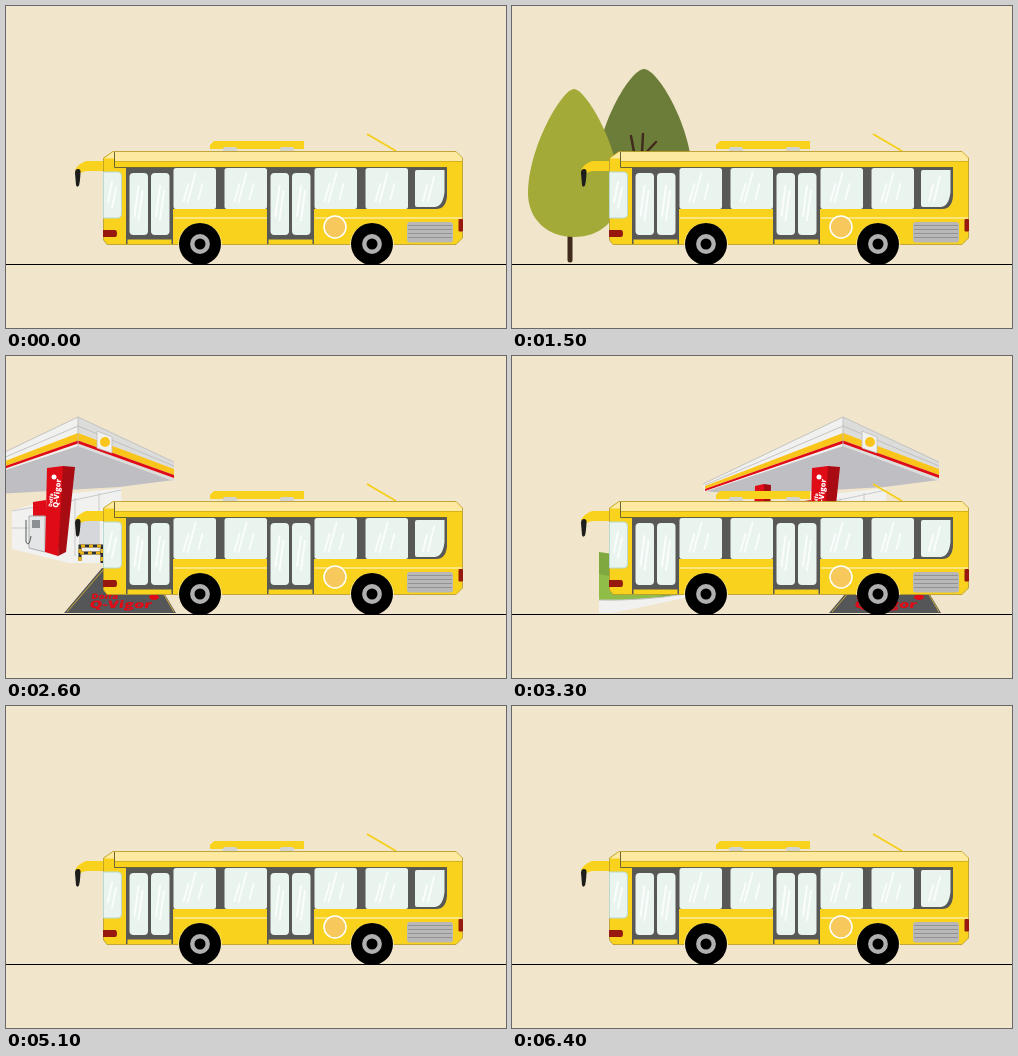
An HTML page that plays this animation: 500 px wide and 322 px high, repeating every 6.5 s.

```html
<!DOCTYPE html>
<html lang="en">
<head>
<meta charset="utf-8">
<title>Trolleybus ride</title>
<style>
  html, body { margin: 0; width: 100%; height: 100%; overflow: hidden; background: #f1e5cb; }
  svg { display: block; width: 100vw; height: 100vh; }
  text { font-family: "Open Sans", "Liberation Sans", sans-serif; font-weight: 800; }

  .pair, .grove, .station { animation: 6.5s infinite; }
  .pair { animation-name: pair; }
  .grove { animation-name: grove; }
  .station { animation-name: station; animation-timing-function: step-end; }

  /* Two passes of 12 steps, 61px each */
  @keyframes pair {
    0% { transform: translateX(-427px); animation-timing-function: steps(12); }
    18.461% { transform: translateX(305px); animation-timing-function: step-end; }
    18.4611% { transform: translateX(-427px); animation-timing-function: steps(12); }
    36.922%, 100% { transform: translateX(305px); }
  }
  @keyframes grove {
    0% { transform: translateX(-480px); animation-timing-function: step-end; }
    81.538% { transform: translateX(-480px); animation-timing-function: steps(12); }
    100% { transform: translateX(342px); }
  }
  @keyframes station {
    0% { transform: translateX(-450px); }
    38.461% { transform: translateX(-345.5px); }
    39.999% { transform: translateX(-259px); }
    43.076% { transform: translateX(-173px); }
    46.153% { transform: translateX(-86px); }
    50.769% { transform: translateX(0); }
    66.153% { transform: translateX(86px); }
    70.769% { transform: translateX(173px); }
    73.846% { transform: translateX(259px); }
    76.923% { transform: translateX(346px); }
    78.461%, 100% { transform: translateX(450px); }
  }

  .glass { fill: #e9f4ee; }
  .shine { fill: none; stroke: #fff; stroke-width: 2; stroke-linecap: round; opacity: .8; }
  .dark { fill: #585856; }
  .body { fill: #f8d21c; }
  .pale { fill: #fdeaa0; }
  .bark { fill: none; stroke: #402b1d; stroke-linecap: round; }
  .red { fill: #df0b16; }
  .white { fill: #f1f1f0; }
  .sun { fill: #fac51b; }
</style>
</head>
<body>
<svg viewBox="0 0 500 322">
  <defs>
    <g id="light">
      <path class="bark" stroke-width="5" d="M-4 215V254"/>
      <path fill="#a3aa37" d="M0 83C12 83 46 142 46 187C46 214 26 231 0 231S-46 214 -46 187C-46 142 -12 83 0 83Z"/>
    </g>
    <g id="deep">
      <path fill="#6c7d39" d="M0 63C14 63 48 122 48 168C48 198 28 214 0 214S-48 198 -48 168C-48 122 -14 63 0 63Z"/>
      <path class="bark" stroke-width="4.5" d="M-4 235L-3 160"/>
      <path class="bark" stroke-width="2.5" d="M-3 165L-1 128M-3 157L-10 146L-13 130M-4 187L-18 173L-20 163M-3 152L12 136M-4 178L10 163"/>
    </g>
    <g id="pane">
      <rect class="glass" width="42.500" height="41" rx="2.5"/>
      <path class="shine" d="M15 16L10 33M22 5L14 34M29 16L25 31"/>
    </g>
    <g id="leaf">
      <rect class="glass" width="18.5" height="62" rx="4"/>
      <path class="shine" d="M9 13L5 43M13 18L9 47"/>
    </g>
    <g id="door">
      <path class="dark" d="M0 0H47V76H45.5V71.5H1.5V76H0Z"/>
      <use href="#leaf" x="3.5" y="5"/>
      <use href="#leaf" x="25" y="5"/>
    </g>
    <g id="wheel">
      <path d="M-22 1A22 22 0 0 1 22 1Z" fill="#fbe88e"/>
      <circle r="21"/>
      <circle r="7.700" fill="none" stroke="#b0b0b0" stroke-width="4.400"/>
    </g>
  </defs>

  <g class="pair">
    <use href="#deep" x="376"/>
    <use href="#light" x="306"/>
  </g>

  <g class="grove">
    <use href="#deep" transform="translate(352 55) scale(.8)"/>
    <use href="#light" transform="translate(276 1)"/>
    <use href="#light" transform="translate(434 26) scale(.9)"/>
  </g>

  <g class="station">
    <!-- lawn and kerb -->
    <path fill="#7fa940" d="M87 196Q112 198 136 212T175 239L140 245H87Z"/>
    <path fill="#8fbd48" d="M87 218Q118 222 150 240L120 245H87Z"/>
    <path class="white" d="M87 244Q130 245 173 238V242Q130 251 100 257H87Z"/>
    <path fill="none" stroke="#c3c4c2" d="M87 244Q130 245 173 238"/>

    <!-- shop -->
    <path class="white" d="M265 155L318 138L374 132L377 207H322L265 193Z"/>
    <path fill="none" stroke="#c9cacc" d="M265 155L318 146L374 134M328 142V200M352 137V196M265 172H298"/>
    <path fill="#d5d7da" d="M332 162H352V190H332Z"/>

    <!-- canopy -->
    <path fill="#bfbec3" d="M192 135L331 88L427 124L372 131L232 139Z"/>
    <path class="white" d="M191 128L331 61L427 106V125L331 90L192 136Z"/>
    <path fill="#dcdcdb" d="M331 61L427 106V125L331 90Z"/>
    <path class="sun" d="M193 130L331 77L427 113V119L331 84.500L193 133Z"/>
    <path class="red" d="M193 133L331 84.500L427 119V122L331 87.500L193 135Z"/>
    <path fill="none" stroke="#b9b9b8" stroke-width=".8" d="M191 128L331 61L427 106M193 129L331 70L427 110M331 61V90"/>
    <path class="white" stroke="#bdbdbc" stroke-width=".8" d="M350 75L365 81V97L350 92Z"/>
    <circle class="sun" cx="358" cy="86" r="5"/>

    <!-- pumps and pillars -->
    <path class="red" d="M243 130L252 128V190L241 187Z"/>
    <path fill="#a50a12" d="M252 128L259 129L257 187L252 190Z"/>
    <path class="red" d="M286 146L299 144V160H286Z"/>
    <path fill="#e4e5e6" stroke="#a8aaac" d="M282 160H298V196L282 192Z"/>
    <path fill="#8d9093" d="M285 164H293V172H285Z"/>
    <path fill="none" stroke="#55575a" d="M279 164V186Q282 192 284 180"/>
    <path class="red" d="M300 112L316 110L321 112L311 200L298 196Z"/>
    <path fill="#a90b13" d="M316 110L328 111L319 196L311 200Z"/>
    <circle cx="307" cy="121" r="2.5" fill="#fff"/>
    <g fill="#fff">
      <text font-size="5" transform="translate(305 151) rotate(-84)">Dolfa</text>
      <text font-size="7.500" transform="translate(311 152) rotate(-84)">Q-Vigor</text>
    </g>
    <path fill="none" stroke="#2f2f2f" stroke-width="3" d="M333 205V190H355V207M333 197H355"/>
    <path fill="none" stroke="#e8b21a" stroke-width="3" stroke-dasharray="4 4" d="M333 205V190H355V207M333 197H355"/>

    <!-- forecourt mat -->
    <path fill="#555657" d="M355 212H402L429 257H317Z"/>
    <path fill="none" stroke="#c9a93a" d="M356 214L320 256M404 216L427 256"/>
    <g class="red">
      <text font-size="9" transform="translate(344 243) skewX(-8) scale(1.1 .85)">Dolfa</text>
      <text font-size="13" transform="translate(342 252) skewX(-10) scale(1.25 .8)">Q-Vigor</text>
      <ellipse cx="407" cy="241" rx="5" ry="3"/>
    </g>
  </g>

  <path d="M0 258.500H500" stroke="#000"/>

  <g class="bus">
    <path d="M361 128L390 145" stroke="#f6cf1d" stroke-width="2"/>
    <path class="body" d="M204 143V139L208 135H298V143Z"/>
    <path fill="#d3d3d0" d="M217 142L219 141H229L231 142V146H217ZM274 142L276 141H286L288 142V146H274Z"/>
    <path class="body" d="M98 155H80Q72 158 69 164L75 167Q77 165 82 165H98Z"/>
    <path fill="#1d1d1b" d="M69 167Q69 163 72 163T74.500 167Q74 176 73 179.500Q71 182 70 179Z"/>

    <path class="body" stroke="#b49a2c" stroke-width=".8" d="M97.500 152L107 145.500H450L456.500 152V232L450 238.500H101L97.500 234Z"/>
    <path class="pale" d="M98 152.500L107 146H450L456 152V155H109V152.500Z"/>
    <path fill="none" stroke="#d0ad18" stroke-width=".8" d="M109 155.500H456"/>
    <path fill="none" stroke="#6d6433" d="M108.500 146V161.500H441"/>
    <path fill="none" stroke="#fdeb9c" stroke-width="1.500" d="M168 212H261M309 212H456"/>

    <path class="glass" stroke="#b9d9d3" d="M97.500 166H112Q115.500 166 115.500 170V208Q115.500 212 112 212H97.500Z"/>
    <path class="shine" d="M106 176L102 196M110 182L106 202"/>
    <path fill="#96180f" d="M97 224H109Q111 224 111 227.500T109 231H97Z"/>

    <path class="dark" d="M167 161.500H441V190Q440 203 430 203H167Z"/>
    <use href="#pane" x="167.500" y="162"/>
    <use href="#pane" x="218.500" y="162"/>
    <use href="#pane" x="308.500" y="162"/>
    <use href="#pane" x="359.500" y="162"/>
    <path class="glass" d="M411 164H438.500V186Q437 200 429 201H411Q409 201 409 199V166Q409 164 411 164Z"/>
    <path class="shine" d="M421 179L417 195M428 171L422 195"/>
    <use href="#door" x="120" y="162"/>
    <use href="#door" x="261" y="162"/>

    <circle cx="329" cy="221" r="11" fill="#f7c95c" stroke="#fff" stroke-width="1.500"/>

    <rect x="401" y="216" width="46" height="20.500" rx="3" fill="#b8b8b8"/>
    <path fill="none" stroke="#929292" d="M402 219.500H446M402 223.500H446M402 227.500H446M402 231.500H446"/>
    <rect x="452.500" y="213" width="4.500" height="12.500" rx="1" fill="#96180f"/>

    <use href="#wheel" x="194" y="238"/>
    <use href="#wheel" x="366" y="238"/>
  </g>
</svg>
</body>
</html>
```
